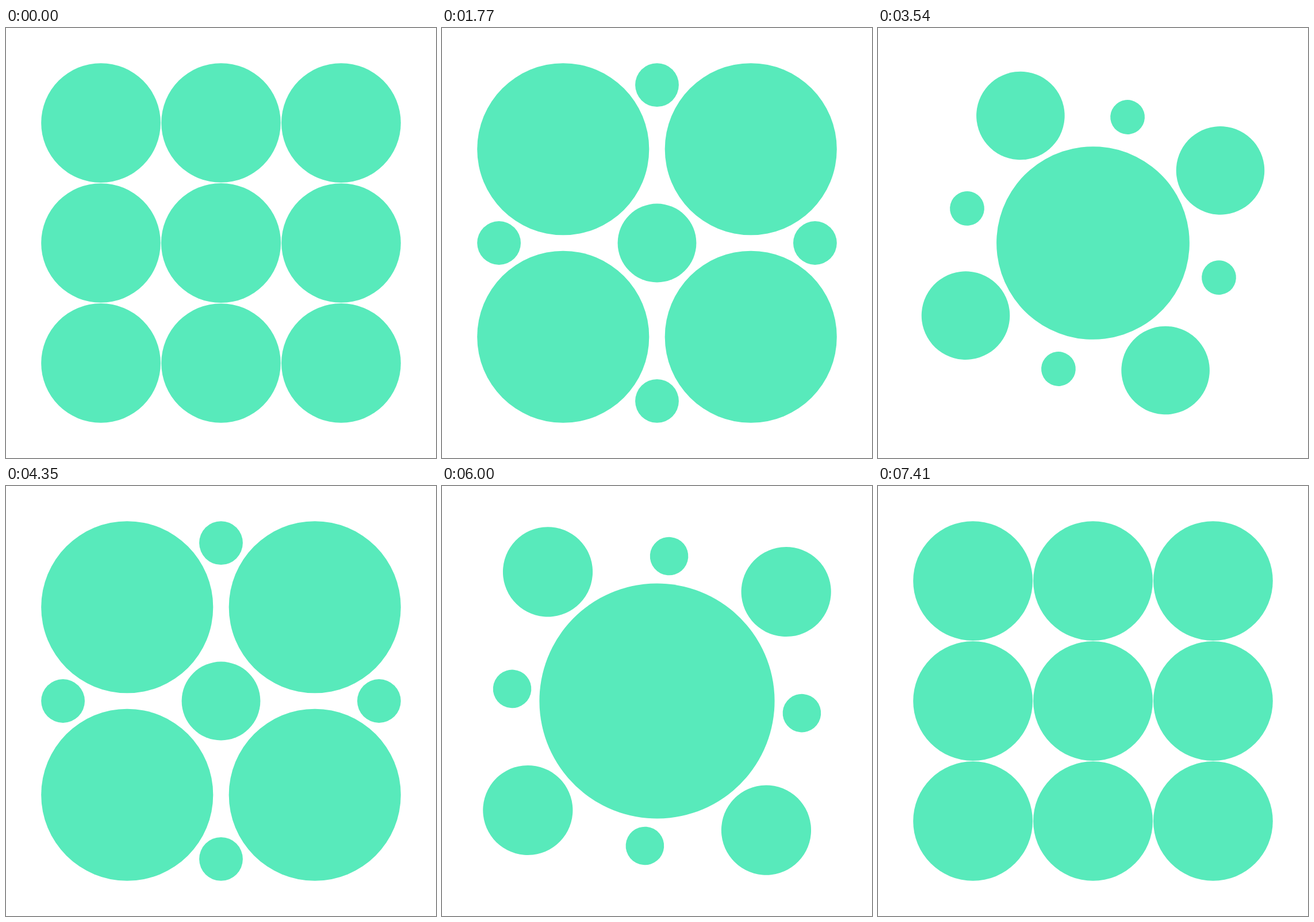
An HTML page that plays this animation: 748x748 px, repeating every 7740 ms.

```html
<!DOCTYPE html>
<html lang="en">
<head>
<meta charset="utf-8">
<title>Nine circles</title>
<style>
  html, body { margin: 0; width: 100%; height: 100%; overflow: hidden; background: #fff; }
  svg { display: block; width: 100%; height: 100%; }
</style>
</head>
<body>
<svg viewBox="0 0 748 748"><g id="group" fill="#58eabb"></g></svg>
<script>
const CENTER = 374, HALF = 312.8;   // all layouts fill the same square
const STEP = 30, CYCLE = 86;        // ms per step, steps per cycle

// Radii of the corner, edge and middle circles
const GRID = [103.9, 103.9, 103.9];
const BLOOM = [81.7, 36.4, 232.4];
const CLOVER = [150.6, 36.4, 67.6];

const MOVES = [
  { start: 0, end: 18, from: GRID, to: BLOOM },
  { start: 22, end: 46, from: BLOOM, to: CLOVER, spin: 90 },
  { start: 56, end: 76, from: CLOVER, to: GRID }
];

const group = document.getElementById('group');
const circles = [];
for (const y of [-1, 0, 1]) {
  for (const x of [-1, 0, 1]) {
    const node = document.createElementNS('http://www.w3.org/2000/svg', 'circle');
    group.append(node);
    circles.push({ node, x, y, kind: x && y ? 0 : x || y ? 1 : 2 });
  }
}

// Bezier easing (x1, 0, x2, 1), solved by bisection
function bezier(x1, x2) {
  return p => {
    if (p <= 0) return 0;
    if (p >= 1) return 1;
    let lo = 0, hi = 1, s = 0.5;
    for (let i = 0; i < 30; i++) {
      const q = 1 - s;
      const x = 3 * q * q * s * x1 + 3 * q * s * s * x2 + s * s * s;
      if (x < p) lo = s; else hi = s;
      s = (lo + hi) / 2;
    }
    return s * s * (3 - 2 * s);
  };
}
const ease = bezier(0.85, 0.5);
const easeDip = bezier(0.55, 0.45);
const LOW = 15 / 24;                // moment of the smallest scale

function draw(ms) {
  const step = (Math.floor(ms / STEP) + 1) % CYCLE;
  const move = MOVES.filter(m => m.start <= step).pop();
  const p = Math.min(1, (step - move.start) / (move.end - move.start));
  const e = ease(p);
  const radii = move.from.map((r, i) => r + (move.to[i] - r) * e);

  let angle = 0, scale = 1;
  if (move.spin) {
    angle = move.spin * e;
    scale = 1 - 0.2 * easeDip(p < LOW ? p / LOW : (1 - p) / (1 - LOW));
  }
  group.setAttribute('transform',
    `translate(${CENTER} ${CENTER}) rotate(${angle}) scale(${scale})`);

  for (const { node, x, y, kind } of circles) {
    const r = radii[kind];
    node.setAttribute('cx', x * (HALF - r));
    node.setAttribute('cy', y * (HALF - r));
    node.setAttribute('r', r);
  }
}

const begin = performance.now();
function tick() {
  draw(performance.now() - begin);
  requestAnimationFrame(tick);
}
tick();
</script>
</body>
</html>
```
